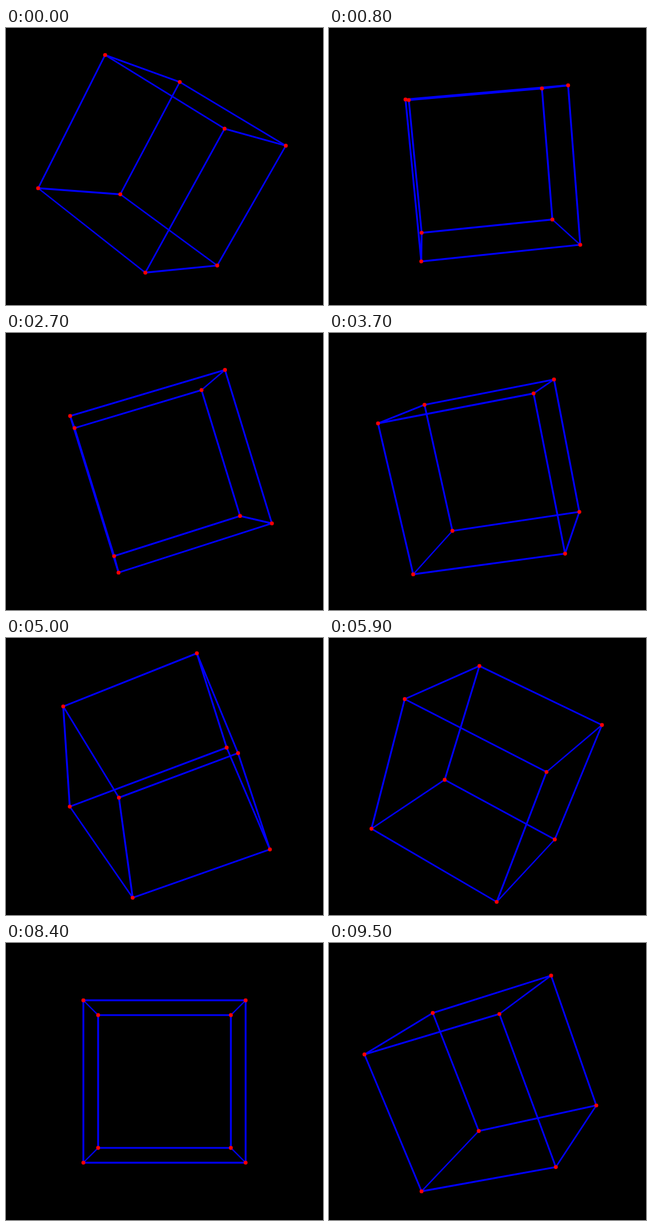
An HTML page with a canvas that plays this animation: 554 px wide and 484 px high, repeating every 9600 ms.

```html
<!DOCTYPE html>
<html lang="en">
<head>
<meta charset="utf-8">
<title>Rotating wireframe cube</title>
<style>
  html, body { margin: 0; width: 100%; height: 100%; overflow: hidden; background: #000; }
  canvas { display: block; }
</style>
</head>
<body>
<canvas id="stage" width="554" height="484"></canvas>
<script>
const ctx = document.getElementById('stage').getContext('2d');
const LOOP = 9600, STEP = 100;
const DISTANCE = 10, SCALE = 1276;

// About 6 degrees per step, with slight timing drift: [step, degrees].
const turns = [[1, 133], [16, 222], [37, 348], [50, 428], [69, 541], [84, 630], [95, 698]];

// Bits 0, 1 and 2 of a corner's index give its x, y and z side.
const corners = Array.from({ length: 8 }, (_, i) => [1, 2, 4].map(bit => (i & bit ? 1 : -1)));
const edges = [];
for (let i = 0; i < 8; i++) {
  for (const bit of [1, 2, 4]) if (!(i & bit)) edges.push([i, i | bit]);
}

function angleAt(step) {
  const next = Math.max(1, turns.findIndex(([s]) => s >= step));
  const [s0, a0] = turns[next - 1], [s1, a1] = turns[next];
  return Math.round(a0 + (a1 - a0) * (step - s0) / (s1 - s0)) * Math.PI / 180;
}

// Turn by the same angle about z, y and x, then apply perspective.
function project([x, y, z], angle) {
  const c = Math.cos(angle), s = Math.sin(angle);
  [x, y] = [c * x - s * y, s * x + c * y];
  [x, z] = [c * x + s * z, c * z - s * x];
  [y, z] = [c * y - s * z, s * y + c * z];
  const k = SCALE / (DISTANCE - z);
  return [277 + x * k, 242 + y * k];
}

function drawEdge([x0, y0], [x1, y1]) {
  const dx = Math.abs(x1 - x0), dy = Math.abs(y1 - y0);
  // Stroke thickness is measured along an axis, so diagonals look thinner.
  ctx.lineWidth = 3.2 * Math.max(dx, dy) / Math.hypot(dx, dy);
  ctx.beginPath();
  ctx.moveTo(x0, y0);
  ctx.lineTo(x1, y1);
  ctx.stroke();
}

function drawDot([x, y]) {
  ctx.beginPath();
  ctx.arc(x, y, 3.4, 0, 2 * Math.PI);
  ctx.fill();
}

function draw(now) {
  const step = Math.max(1, Math.floor(now % LOOP / STEP));
  const angle = angleAt(step);
  const points = corners.map(corner => project(corner, angle));
  ctx.fillStyle = '#000';
  ctx.fillRect(0, 0, 554, 484);
  ctx.strokeStyle = '#00f';
  for (const [a, b] of edges) drawEdge(points[a], points[b]);
  ctx.fillStyle = '#f00';
  points.forEach(drawDot);
}

const start = performance.now();
function tick() {
  draw(performance.now() - start);
  requestAnimationFrame(tick);
}
tick();
</script>
</body>
</html>
```
